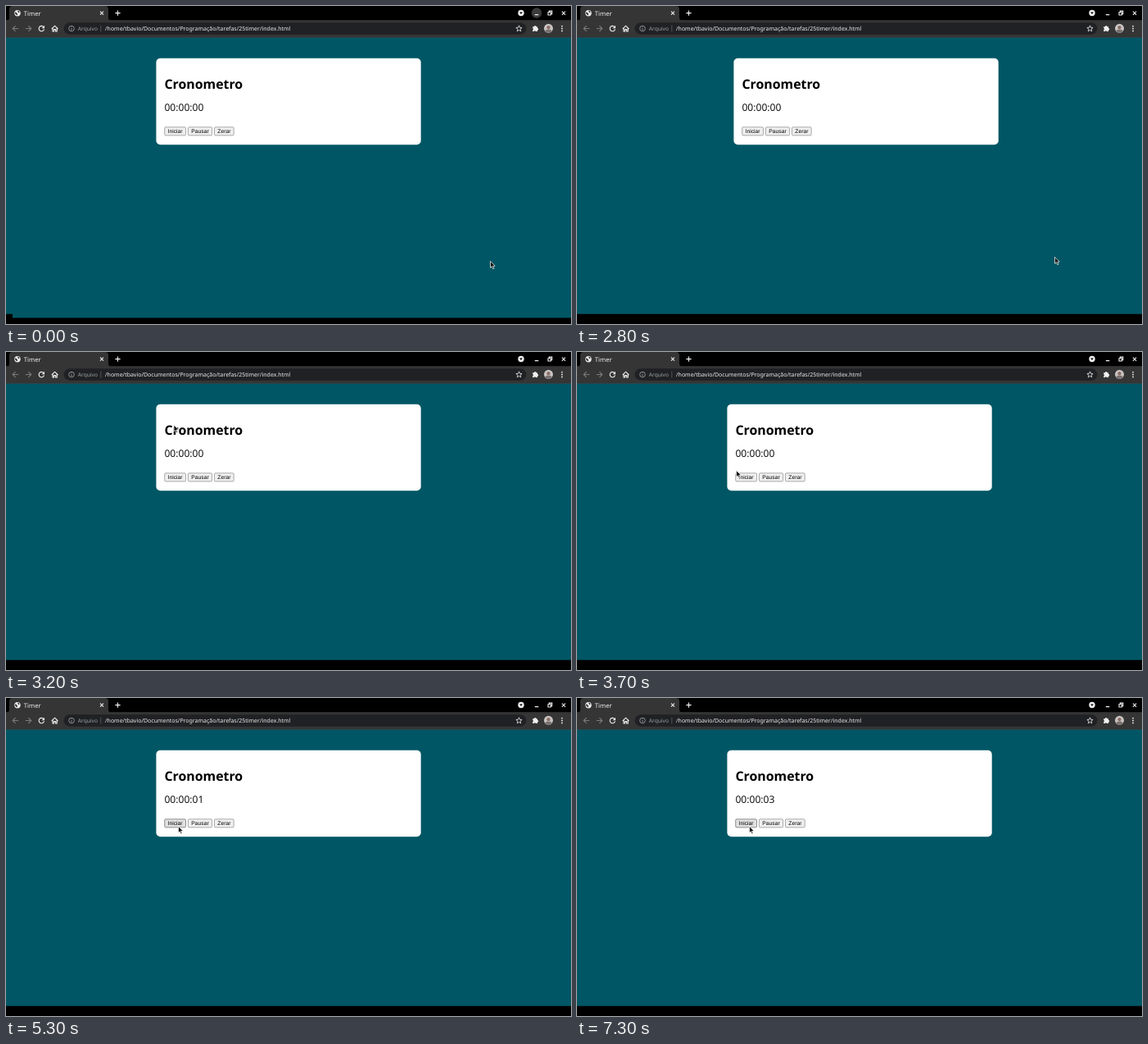
These frames come from a looping animation (690x388 px, 8000 ms). An HTML page:

```html
<!DOCTYPE html>
<html lang="pt">
<head>
<meta charset="utf-8">
<title>Timer</title>
<style>
  html, body { margin: 0; width: 100%; height: 100%; overflow: hidden; background: #000; }
  svg { display: block; width: 100vw; height: 100vh; }
  text { font-family: "Noto Sans", "Open Sans", sans-serif; text-rendering: geometricPrecision; white-space: pre; }
  .line { fill: none; stroke: #f1f1f1; stroke-width: 1.1; }
  .button rect { fill: #efefef; stroke: #767676; stroke-width: .6; }
  .button text { font-family: "Liberation Sans", Arial, sans-serif; font-size: 6.73px; text-anchor: middle; }
  .button.hover rect { fill: #e0e0e0; stroke: #4f4f4f; }
  .button.press rect { fill: #f5f5f5; stroke: #8d8d8d; }
</style>
</head>
<body>
<svg viewBox="0 0 690 388" preserveAspectRatio="none">
  <rect width="690" height="388" fill="#000"/>

  <!-- tab strip -->
  <path d="M0 18Q4 18 4 14V4Q4 0 8 0H121Q125 0 125 4V14Q125 18 129 18Z" fill="#353535"/>
  <circle cx="14" cy="8.7" r="3.7" fill="#f1f1f1"/>
  <path d="M11 7.2L13 8.2 14.2 10 13.3 11.6 11.2 9.6ZM14 5.4L16.4 6.6 16 8.4 14.6 7.6Z" fill="#353535"/>
  <text x="21.8" y="11.5" font-size="7.7" fill="#eee">Timer</text>
  <path class="line" d="M115 6.6L119 10.6M119 6.6L115 10.6M133.4 8.6H139.6M136.5 5.5V11.7"/>
  <circle cx="629" cy="8.5" r="3.7" fill="#f1f1f1"/>
  <path d="M627.1 7.5H630.9L629 9.9Z" fill="#000"/>
  <circle id="minimize" cx="648" cy="8.5" r="6.2" fill="#3c3c3c"/>
  <path class="line" d="M645.8 10.6H650.3M662 7.7H665.4V11H662ZM663.3 7.4V6.1H666.8V9.7H665.6M678.9 6.6L683.1 10.8M683.1 6.6L678.9 10.8"/>

  <!-- toolbar -->
  <rect y="17.2" width="690" height="21.4" fill="#353535"/>
  <rect y="38" width="690" height=".7" fill="#4b4c4f"/>
  <path class="line" style="stroke:#7b7b7b" d="M15.2 27.5H8.3M11.6 24.1L8.2 27.5 11.6 30.9M23.8 27.5H30.7M27.4 24.1L30.8 27.5 27.4 30.9"/>
  <path class="line" d="M46 25.7A3.2 3.2 0 1 0 46.5 28.3"/>
  <path d="M47 23.8V27.2H43.6Z" fill="#f1f1f1"/>
  <path class="line" d="M55.8 28L59.6 24.2 63.4 28M57 27V31H58.6V28.6H60.6V31H62.2V27"/>
  <rect x="70.5" y="20.3" width="565" height="14.4" rx="7.2" fill="#202124"/>
  <g fill="none" stroke="#a4a7aa" stroke-width=".8">
    <circle cx="80" cy="27.5" r="3.3"/>
    <path d="M80 27V29.6M80 25.4V26.2"/>
    <path d="M115.8 23.5V31.5" stroke="#66696d" stroke-width=".7"/>
  </g>
  <text x="87.8" y="30" font-size="6.65" fill="#9aa0a6">Arquivo</text>
  <text x="121" y="30" font-size="6.97" fill="#eee">/home/tbavio/Documentos/Programação/tarefas/25timer/index.html</text>
  <path class="line" style="stroke-width:.8" d="M626.5 23.8L627.5 26.3 630.1 26.5 628.1 28.2 628.7 30.8 626.5 29.4 624.3 30.8 624.9 28.2 622.9 26.5 625.5 26.3Z"/>
  <path d="M643.2 25.2H645A1.2 1.2 0 0 1 647.4 25.2H649V27A1.2 1.2 0 0 1 649 29.4V31H646.9A1.1 1.1 0 0 0 644.8 31H643.2V29A1.1 1.1 0 0 0 643.2 26.9Z" fill="#f1f1f1"/>
  <circle cx="662.5" cy="27.3" r="5.5" fill="#c9c5c4"/>
  <path d="M658.4 31Q659 28.6 662.5 28.6T666.6 31Q665 32.8 662.5 32.8T658.4 31Z" fill="#77706f"/>
  <circle cx="662.5" cy="26.2" r="2.1" fill="#8c6d63"/>
  <g fill="#f1f1f1">
    <circle cx="679" cy="24.6" r=".9"/><circle cx="679" cy="27.5" r=".9"/><circle cx="679" cy="30.4" r=".9"/>
  </g>

  <!-- page -->
  <rect y="38.6" width="690" height="337.2" fill="#005664"/>
  <rect id="strip" x="8" y="375" width="682" height="5.5" fill="#005664"/>
  <g id="card">
    <rect x="183.4" y="63.8" width="323.3" height="105.5" rx="5" fill="#fff"/>
    <text x="193.4" y="100.5" font-size="15.9" font-weight="700">Cronometro</text>
    <text id="clock" x="193.4" y="128.4" font-size="12.12" fill="#111"></text>
    <g id="buttons"></g>
  </g>
  <path id="cursor" d="M0 0V8L1.8 6.4 3.2 9.4 4.6 8.8 3.2 6 5.7 5.8Z" fill="#111" stroke="#fff" stroke-width=".7" stroke-linejoin="round"/>
</svg>
<script>
  const LOOP = 8000, RESIZE = 2800, RESIZED = 2900, HOVER = 3800, PRESS = 4100, START = 4300;
  const $ = id => document.getElementById(id);

  // time, x, y of the pointer; each position holds until the next
  const pointer = [
    [0, 591.5, 311.3], [2800, 583.5, 306.3], [3000, 537, 290], [3100, 370, 190], [3200, 205, 89],
    [3500, 203, 101], [3600, 198, 124], [3700, 194.6, 144.5], [3800, 203, 152], [3900, 210.5, 156.5]
  ];

  function addButton(label, x, width) {
    $("buttons").insertAdjacentHTML("beforeend",
      `<g class="button"><rect x="${x}" y="147.8" width="${width}" height="10.1" rx="1.3"/>
       <text x="${x + width / 2}" y="155.2">${label}</text></g>`);
    return $("buttons").lastElementChild;
  }

  const startButton = addButton("Iniciar", 193.7, 25.8);
  addButton("Pausar", 222.4, 29.2);
  addButton("Zerar", 254.5, 23.7);

  function formatTime(seconds) {
    const parts = [Math.floor(seconds / 3600), Math.floor(seconds / 60) % 60, seconds % 60];
    return parts.map(n => String(n).padStart(2, "0")).join(":");
  }

  function update(t) {
    const [, x, y] = pointer.findLast(p => p[0] <= t);
    $("cursor").setAttribute("transform", `translate(${x} ${y})`);
    $("card").setAttribute("transform", `translate(${t >= RESIZE && t < RESIZED ? 8 : 0} 0)`);

    const before = t < RESIZE ? "visible" : "hidden";
    $("strip").setAttribute("visibility", before);
    $("minimize").setAttribute("visibility", before);

    const pressed = t >= PRESS && t < START;
    startButton.setAttribute("class", "button" + (pressed ? " press" : t >= HOVER ? " hover" : ""));
    $("clock").textContent = formatTime(Math.max(0, Math.floor((t - START) / 1000)));
  }

  const begin = performance.now();
  function tick() {
    update((performance.now() - begin) % LOOP);
    requestAnimationFrame(tick);
  }
  tick();
</script>
</body>
</html>
```
